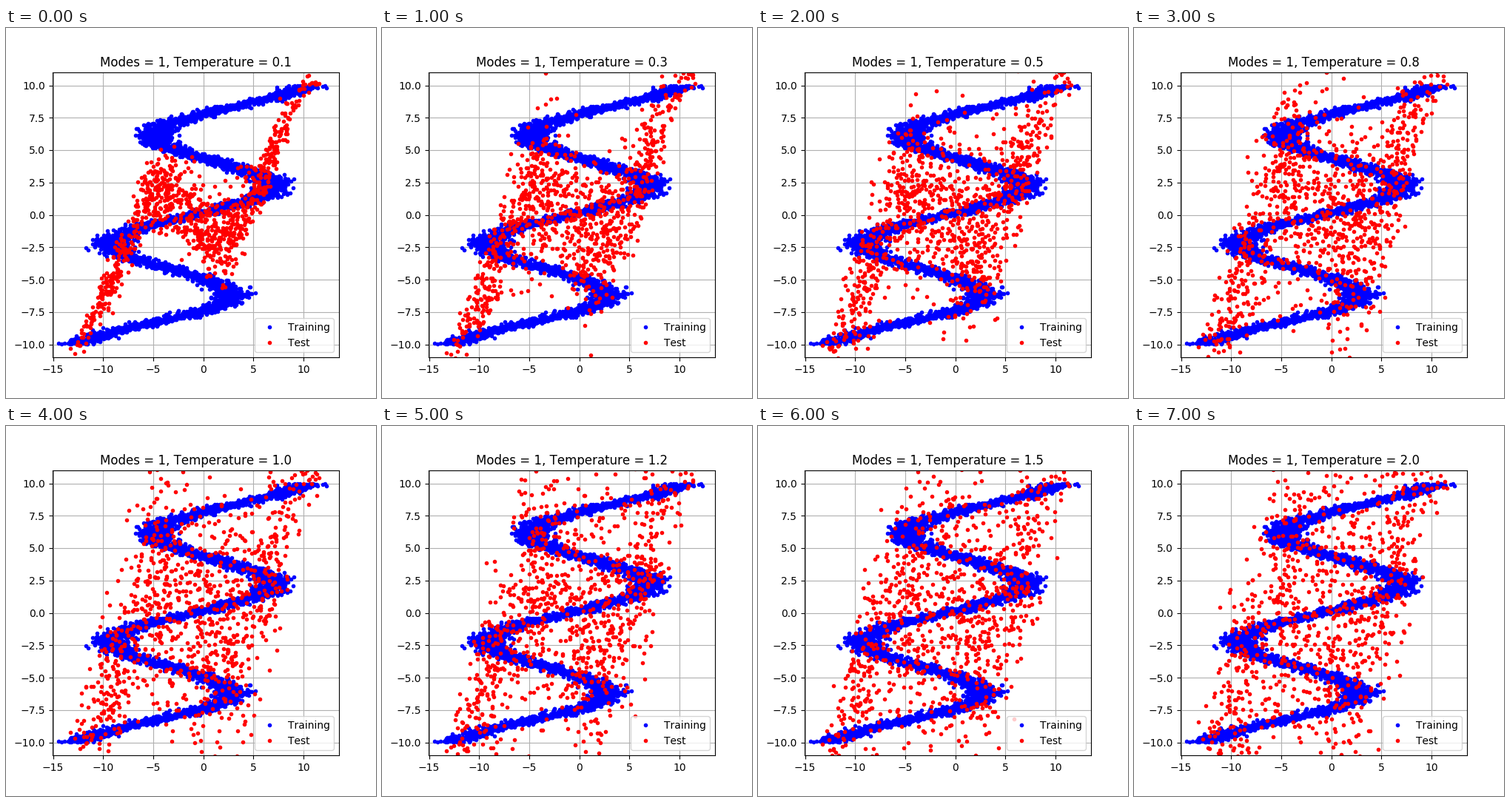
Write a matplotlib script that moves like this. It is 500 px wide and 500 px high and loops after 8000 ms.

```python
import numpy as np
import matplotlib.pyplot as plt
from matplotlib.animation import FuncAnimation

plt.rcParams["text.kerning_factor"] = 6

TEMPERATURES = [0.1, 0.3, 0.5, 0.8, 1.0, 1.2, 1.5, 2.0]
OFFSET = -1.1  # the data is point symmetric around (OFFSET, 0)


def make_data(rng, n):
    y = rng.uniform(-10, 10, n)
    noise = np.clip(rng.normal(OFFSET, 0.9, n), OFFSET - 2.8, OFFSET + 2.6)
    return 7 * np.sin(0.75 * y) + 0.5 * y + noise, y


def predict(x):
    """Mean and unit-temperature spread of y, given x."""
    u = x - OFFSET
    wave = np.pi * u / 10
    mean = 0.8 * u - 4.2 * np.sin(wave) - 0.9 * np.sin(2 * wave)
    spread = 5.2 * np.cos(np.pi * u / 27)
    return np.clip(mean, -10.3, 10.3), np.maximum(spread, 0.9)


def sample(frame):
    rng = np.random.default_rng(100 + frame)
    mean, spread = predict(test_x)
    return mean + spread * np.sqrt(TEMPERATURES[frame]) * rng.normal(size=test_x.size)


rng = np.random.default_rng(7)
train_x, train_y = make_data(rng, 4000)
test_x, _ = make_data(rng, 1000)

fig, ax = plt.subplots(figsize=(5, 5), dpi=100)
ax.plot(train_x, train_y, "b.", label="Training")
test_dots, = ax.plot(test_x, sample(0), "r.", label="Test")
ax.set_xlim(-15.08, 13.53)
ax.set_ylim(-11, 11)
ax.grid(True)
ax.legend(loc="lower right")
title = ax.set_title("")


def update(frame):
    test_dots.set_ydata(sample(frame))
    title.set_text(f"Modes = 1, Temperature = {TEMPERATURES[frame]:.1f}")
    return test_dots, title


anim = FuncAnimation(fig, update, frames=len(TEMPERATURES), interval=1000,
                     repeat=True, repeat_delay=0)
plt.show()
```
